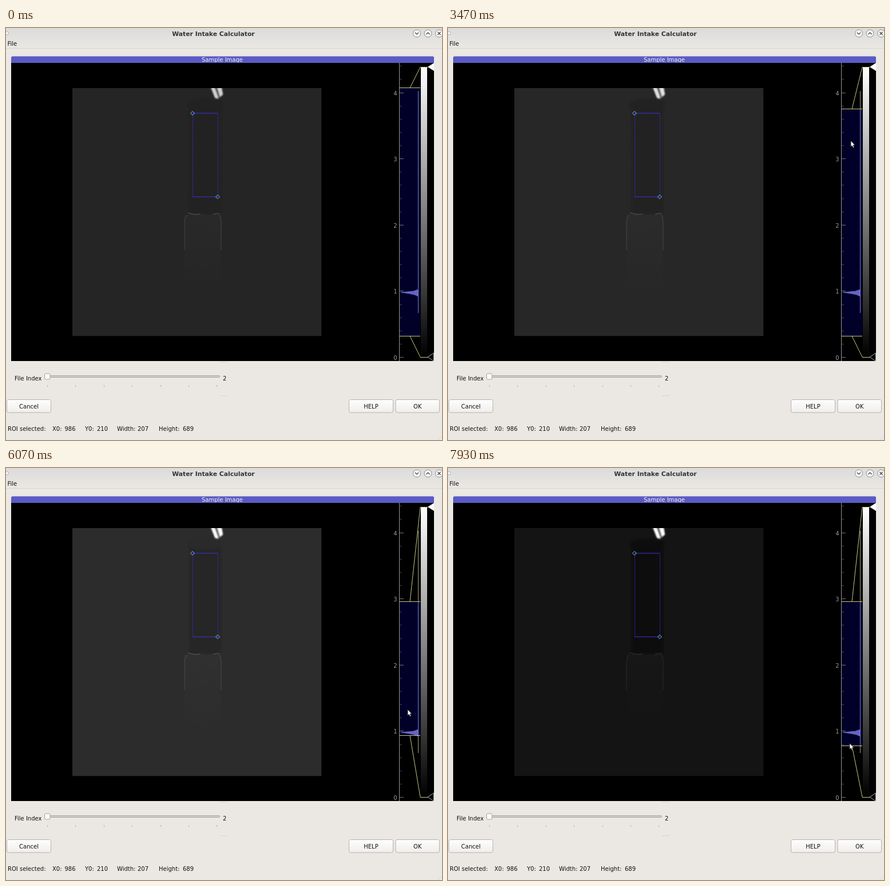
These frames come from a looping animation (762x720 px, 8 s). An HTML page:

```html
<!DOCTYPE html>
<html lang="en">
<head>
<meta charset="utf-8">
<title>Water Intake Calculator</title>
<style>
html, body { margin: 0; width: 100%; height: 100%; overflow: hidden; background: #ebe8e3; }
svg { display: block; }
text { font: 10px "DejaVu Sans", sans-serif; fill: #111; white-space: pre; }
.title { font-weight: bold; font-size: 10.8px; fill: #333; }
.mid { text-anchor: middle; }
.axis { text-anchor: end; fill: #969696; }
.level { stroke: #c8c882; fill: none; }
.btn { fill: url(#face); stroke: #b5b2ad; }
.round { fill: #f3f3f2; stroke: #8f8f8f; }
.glyph { fill: none; stroke: #444; stroke-width: 1.2; }
.handle { fill: none; stroke: #78bee6; }
</style>
</head>
<body>
<svg width="762" height="720" viewBox="0 0 762 720">
  <defs>
    <linearGradient id="bar" x2="0" y2="1"><stop stop-color="#dcdbda"/><stop offset="1" stop-color="#ebe8e3"/></linearGradient>
    <linearGradient id="face" x2="0" y2="1"><stop stop-color="#fefefe"/><stop offset="1" stop-color="#f0eeeb"/></linearGradient>
    <linearGradient id="ramp" x2="0" y2="1"><stop stop-color="#fff"/><stop offset="1" stop-color="#000"/></linearGradient>
    <linearGradient id="fade" x2="0" y2="1"><stop stop-color="#fff" stop-opacity=".05"/><stop offset="1" stop-color="#fff" stop-opacity="0"/></linearGradient>
    <filter id="soft" x="-50%" y="-50%" width="200%" height="200%"><feGaussianBlur stdDeviation=".9"/></filter>
    <clipPath id="view"><rect x="116" y="105" width="435.500" height="433.500"/></clipPath>
    <clipPath id="plot"><rect x="9" y="61" width="739" height="521"/></clipPath>
    <clipPath id="label"><rect x="9" y="49" width="739" height="11"/></clipPath>
  </defs>

  <rect width="762" height="720" fill="#ebe8e3"/>
  <rect width="762" height="36" fill="url(#bar)"/>
  <path d="M0 35.500H762" stroke="#d9d6d2"/>
  <circle cx="2" cy="9" r="2.500" fill="#fff" stroke="#aaa"/>
  <text class="title mid" x="362.500" y="13.500">Water Intake Calculator</text>
  <text x="2.500" y="31">File</text>
  <g id="titleButtons"></g>

  <path d="M9 61V52q0-2.500 2.500-2.500H745.500q2.500 0 2.500 2.500V61Z" fill="#5b5bc5"/>
  <g clip-path="url(#label)"><text class="mid" x="378" y="59" style="fill:#eee">Sample Image</text></g>

  <g clip-path="url(#plot)">
    <rect x="9" y="61" width="739" height="521"/>
    <g clip-path="url(#view)">
      <rect id="photo" x="116" y="105" width="435.500" height="433.500"/>
      <g filter="url(#soft)">
        <rect id="tube" x="321" y="138" width="55" height="186"/>
        <ellipse id="neck" cx="348" cy="133" rx="31" ry="10"/>
      </g>
      <g id="detail">
        <rect x="312" y="326" width="64" height="140" fill="url(#fade)" opacity=".4"/>
        <path d="M312 388V340q0-10 5-13M376 388V340q0-9-3-13" fill="none" stroke="#fff" stroke-opacity=".09" stroke-width="1.500"/>
        <path d="M318 323q10 4 22 2M362 326q6-3 12-1" fill="none" stroke="#fff" stroke-opacity=".16" stroke-width="1.500"/>
        <g id="specks" fill="#fff"></g>
      </g>
      <g id="glare" filter="url(#soft)">
        <path d="M357 103H378L379.500 117L370 125L364 121Z" fill="#666"/>
        <path d="M358 103H364L371 122L366 123ZM369 103H376L379 116L374 120Z" fill="#fff"/>
      </g>
    </g>
    <path d="M326 149H370M326 295H370" stroke="#3c32dc" stroke-width="1.200"/>
    <path d="M326.500 149V295M370.500 149V295" stroke="#3228c8" stroke-dasharray="2 1"/>
    <path class="handle" d="M322.500 149l3.500-3.500 3.500 3.500-3.500 3.500ZM366.500 295l3.500-3.500 3.500 3.500-3.500 3.500Z"/>

    <rect id="region" x="688" width="36"/>
    <g id="ticks" stroke="#707080"></g>
    <path d="M687.500 61V582" stroke="#969696"/>
    <path d="M720.500 457L712 460L690 462L704 464L714 466L720.500 469Z" fill="#6464c8" stroke="#8282dc" stroke-width=".6"/>
    <path d="M720.500 110V498" stroke="#a0a078"/>
    <path id="trace" stroke="#7878e6"/>
    <path id="top" class="level"/>
    <path id="bottom" class="level"/>
    <rect x="725" y="69" width="11" height="506" fill="url(#ramp)"/>
    <path d="M737 68L748 61V75Z" fill="#fff"/>
    <path d="M737 575L747.500 568V582Z" stroke="#aaa"/>
    <path d="M724 575.500H737M724 68.500H737" class="level"/>
  </g>

  <text x="15" y="616">File Index</text>
  <rect x="62" y="604" width="5" height="14" fill="#ebe8e3"/>
  <rect x="68.500" y="607.500" width="305" height="3" rx="1" fill="#d0cdc9" stroke="#aaa7a3"/>
  <rect x="67.500" y="604" width="9.500" height="10" rx="2" fill="#fafafa" stroke="#a3a09c"/>
  <text x="379" y="616">2</text>
  <path id="marks" stroke="#b2afab"/>
  <path d="M374 583.500H387M374 642.500H387" stroke="#c6c3be" stroke-dasharray="1 1"/>
  <path d="M756 719L761 714" stroke="#c6c3be" stroke-dasharray="1 1"/>
  <g id="buttons"></g>
  <g id="status"></g>
  <path id="cursor" d="M0 0V10.500L2.300 8.500L4 12.300L5.800 11.500L4.200 7.800H7.300Z" stroke-width=".9"/>
</svg>

<script>
const $ = id => document.getElementById(id);
const set = (id, attrs) => { for (const a in attrs) $(id).setAttribute(a, attrs[a]); };

// Static parts that repeat
$('titleButtons').innerHTML = [[718, 'M-3-1.500L0 1.500L3-1.500'], [737.5, 'M-3 1.500L0-1.500L3 1.500'], [757, 'M-2.500-2.500L2.500 2.500M2.500-2.500L-2.500 2.500']]
  .map(([x, d]) => `<g transform="translate(${x} 9.500)"><circle class="round" r="6.500"/><path class="glyph" d="${d}"/></g>`).join('');
$('buttons').innerHTML = [[1.5, 77, 'Cancel'], [599.5, 77, 'HELP'], [681, 76.5, 'OK']]
  .map(([x, w, s]) => `<rect class="btn" x="${x}" y="649.500" width="${w}" height="22.500" rx="3"/><text class="mid" x="${x + w / 2}" y="664.500">${s}</text>`).join('');
$('status').innerHTML = [[3, 'ROI selected:'], [81, 'X0:'], [102.5, '986'], [138, 'Y0:'], [159, '210'], [194, 'Width:'], [230, '207'], [267, 'Height:'], [309, '689']]
  .map(([x, s]) => `<text x="${x}" y="704">${s}</text>`).join('');
$('marks').setAttribute('d', Array.from({length: 7}, (_, i) => `M${Math.round(72 + i * 49.4) + .5} 624V627`).join(''));

let ticks = '';
for (let i = 0; i <= 22; i++) {
  const y = Math.round(576 - i * 23.12), major = i % 5 === 0;
  ticks += `<path d="M688 ${y - .5}h${major ? 7 : 4}" opacity="${major ? 1 : .55}"/>`;
  if (major) ticks += `<text class="axis" stroke="none" x="683.500" y="${y + 4}">${i / 5}</text>`;
}
$('ticks').innerHTML = ticks;

let seed = 7;
const rand = () => (seed = seed * 16807 % 2147483647) / 2147483647;
let specks = '';
for (let i = 0; i < 160; i++) {
  specks += `<rect x="${(314 + rand() * 60).toFixed(1)}" y="${(150 + rand() * 310).toFixed(1)}" width="1" height="1" opacity="${(rand() * .07).toFixed(3)}"/>`;
}
$('specks').innerHTML = specks;

// Motion: [time, value, time, value, ...]
const track = (...k) => t => {
  if (t <= k[0]) return k[1];
  for (let i = 2; i < k.length; i += 2) {
    if (t <= k[i]) return k[i - 1] + (k[i + 1] - k[i - 1]) * (t - k[i - 2]) / (k[i] - k[i - 2]);
  }
  return k[k.length - 1];
};
const cursorX = track(270, 103, 1070, 667, 1130, 667, 1530, 714, 1870, 714, 2130, 702, 2730, 703, 3470, 704, 4600, 704, 5000, 697, 5270, 700, 5670, 700, 6070, 702);
const cursorY = track(270, 320, 1070, 166, 1130, 166, 1530, 104, 1870, 104, 2130, 121, 2270, 121, 2730, 106, 2870, 106, 3470, 197, 3730, 205, 4530, 232,
  4600, 232, 5000, 517, 5270, 532, 5670, 532, 6070, 422, 6250, 405, 6530, 405, 7000, 448, 7270, 452, 7600, 452, 7930, 481);
const topY = track(2950, 105, 3470, 142, 3670, 165, 3730, 165, 4530, 234);
const bottomY = track(5700, 538, 6070, 467, 6300, 410, 6530, 408, 7000, 449, 7270, 452, 7600, 452, 7930, 485);
const gray = track(2870, 37, 3470, 39, 3730, 40, 4530, 53, 5000, 55, 5670, 55, 6070, 44, 6130, 20, 6200, 0, 7600, 0, 7930, 20);
const glare = track(2870, .8, 4530, 1);
const shade = v => { v = Math.max(0, Math.round(v)); return `rgb(${v},${v},${v})`; };

function draw(t) {
  const yt = topY(t), yb = bottomY(t), g = gray(t);
  const hover = (t > 2330 && t < 2900) || (t > 4640 && t < 5700);
  const lt = Math.round(yt) - .5, lb = Math.round(yb) + .5;
  set('photo', {fill: shade(g)});
  set('tube', {fill: shade(g - Math.min(10, 4 + (t > 7600 ? 5 : (g - 37) / 4)))});
  set('neck', {fill: shade(g - 3)});
  set('detail', {opacity: Math.min(1, g / 30)});
  set('glare', {opacity: glare(t)});
  set('region', {y: yt, height: yb - yt, fill: hover ? '#00005a' : '#000028'});
  set('trace', {d: `M720.500 ${Math.max(yt, 110)}V${Math.min(yb, 498)}`});
  set('top', {d: `M688 ${lt}H724M706 ${lt}L724 68.500`});
  set('bottom', {d: `M688 ${lb}H724M706 ${lb}L724 575`});
  const dark = t < 2800;
  set('cursor', {
    transform: `translate(${cursorX(t)} ${cursorY(t)})`,
    fill: dark ? '#111' : '#fff',
    stroke: dark ? '#e6e6c8' : '#222',
    visibility: t < 270 ? 'hidden' : 'visible'
  });
}

const start = performance.now();
function loop() {
  draw((performance.now() - start) % 8000);
  requestAnimationFrame(loop);
}
loop();
</script>
</body>
</html>
```
